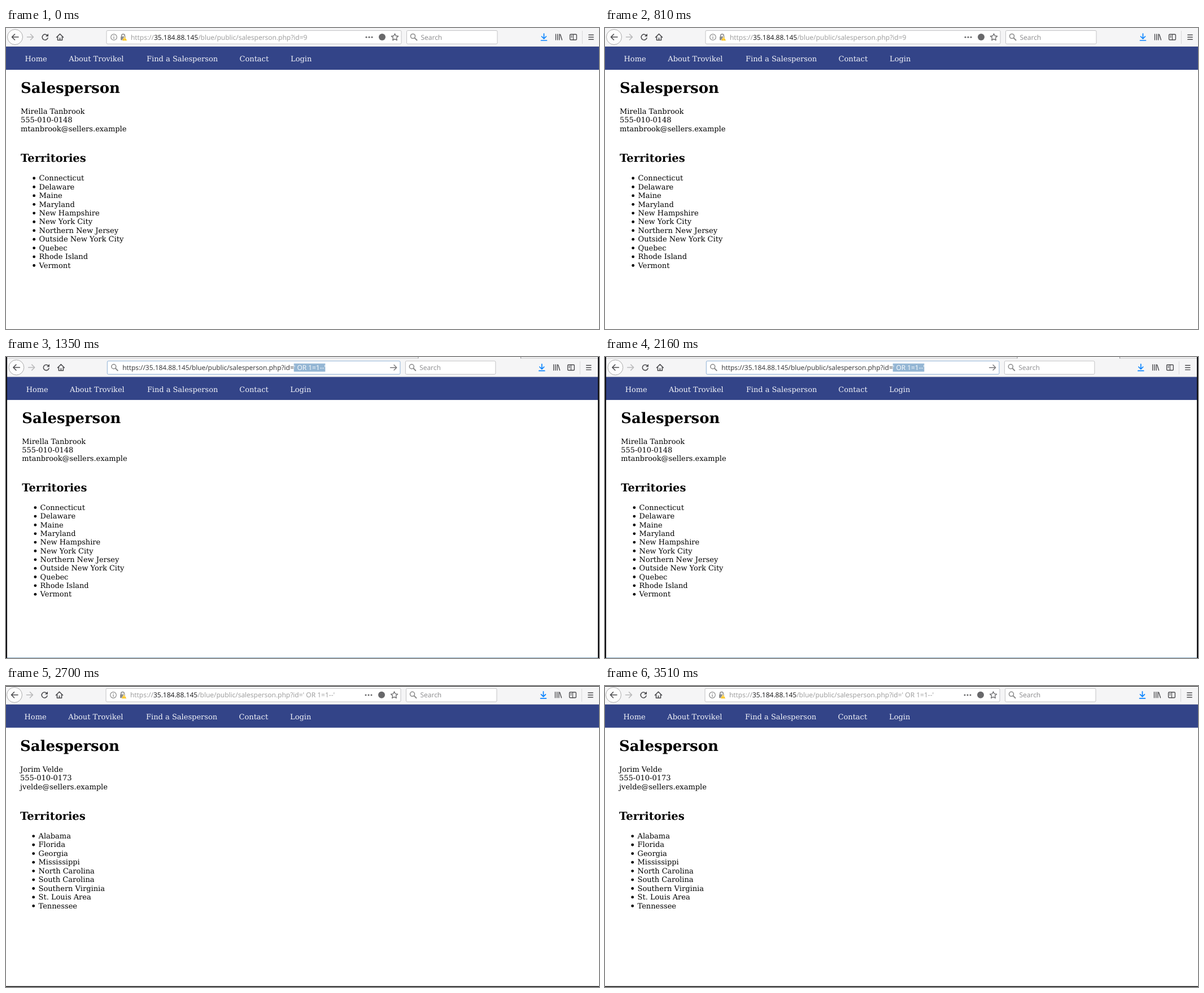
Animation, 1050 px wide and 533 px high, one loop 4.05 s. Source, as an HTML page:

```html
<!DOCTYPE html>
<html lang="en">
<head>
<meta charset="utf-8">
<title>Salesperson</title>
<style>
  html, body { margin: 0; width: 100%; height: 100%; overflow: hidden; background: #fff; }
  svg { display: block; width: 1050px; height: 533px; text-rendering: geometricPrecision; }
  .page { font: 13px "DejaVu Serif", serif; fill: #000; }
  .ui { font: 12px "Open Sans", sans-serif; }
</style>
</head>
<body>
<svg id="stage" viewBox="0 0 1050 533"></svg>
<script>
const HOLD = 1350;
const LINE = 15.45;
const INK = '#4c4c4f', GREY = '#8c8c8c';
const URL_PATH = '/blue/public/salesperson.php?id=';
const HOST = '35.184.88.145';
const INJECTED = "' OR 1=1--'";

const rect = (x, y, w, h, fill, more = '') =>
  `<rect x="${x}" y="${y}" width="${w}" height="${h}" fill="${fill}" ${more}/>`;
const dot = (x, y, r, fill, more = '') =>
  `<circle cx="${x}" cy="${y}" r="${r}" fill="${fill}" ${more}/>`;
const stroke = (d, color, w = 1.5) =>
  `<path d="${d}" fill="none" stroke="${color}" stroke-width="${w}" stroke-linecap="round" stroke-linejoin="round"/>`;
const text = (x, y, s, more = '') => `<text x="${x}" y="${y}" ${more}>${s}</text>`;
const span = (s, fill) => `<tspan fill="${fill}">${s}</tspan>`;

const people = {
  first: {
    contact: ['Mirella Tanbrook', '555-010-0148', 'mtanbrook@sellers.example'],
    areas: ['Connecticut', 'Delaware', 'Maine', 'Maryland', 'New Hampshire', 'New York City',
      'Northern New Jersey', 'Outside New York City', 'Quebec', 'Rhode Island', 'Vermont']
  },
  second: {
    contact: ['Jorim Velde', '555-010-0173', 'jvelde@sellers.example'],
    areas: ['Alabama', 'Florida', 'Georgia', 'Mississippi', 'North Carolina', 'South Carolina',
      'Southern Virginia', 'St. Louis Area', 'Tennessee']
  }
};

const magnifier = x =>
  dot(x - 1.5, 14.5, 4, 'none', `stroke="${GREY}" stroke-width="1.6"`) +
  stroke(`M${x + 1.6} 17.6L${x + 5.5} 21.5`, GREY, 2);

function star(cx, cy, r) {
  const pts = Array.from({ length: 10 }, (_, i) => {
    const a = i * Math.PI / 5 - Math.PI / 2, k = i % 2 ? r * 0.48 : r;
    return `${(cx + k * Math.cos(a)).toFixed(2)} ${(cy + k * Math.sin(a)).toFixed(2)}`;
  });
  return stroke(`M${pts.join('L')}Z`, '#68686a', 1.3);
}

function navButtons() {
  return dot(16, 16, 13.5, '#fdfdfd', 'stroke="#aaa"') +
    stroke('M22 16H11M15.5 11L10.5 16L15.5 21', INK, 1.6) +
    stroke('M37.5 16H48M43.5 11L48.5 16L43.5 21', '#b9b9ba', 1.6) +
    stroke('M73.2 13.2A5 5 0 1 0 74 17.5', INK, 1.6) +
    `<path d="M75 10V15H70Z" fill="${INK}"/>` +
    stroke('M89.5 16.5L95.5 10.5L101.5 16.5M91.5 15.5V21.5H99.5V15.5M95.5 21V17.8', INK, 1.6);
}

function menuButtons() {
  return stroke('M952.5 10V18.5M948.5 15L952.5 19L956.5 15M947.5 22H957.5', '#0a84ff', 1.7) +
    stroke('M973.5 11V21M976.7 11V21M979.9 11V21M981.5 11.5L984.5 21', INK, 1.4) +
    rect(998.6, 11.2, 11.8, 9.8, 'none', `rx="1.5" stroke="${INK}" stroke-width="1.4"`) +
    stroke('M1004.5 11.5V21M1000.8 13.8H1002.4M1000.8 16.2H1002.4', INK, 1.2) +
    rect(1020, 5, 1, 23, '#d9d9da') +
    stroke('M1031.8 12.2H1040.2M1031.8 16.2H1040.2M1031.8 20.2H1040.2', INK, 1.4);
}

function idleAddress(query) {
  return dot(191, 16.2, 5.3, 'none', `stroke="${GREY}" stroke-width="1.2"`) +
    stroke('M191 15.8V19', GREY, 1.3) + dot(191, 13.5, 0.8, GREY) +
    stroke('M204.7 15.5V13.5A2.8 2.8 0 0 1 210.3 13.5V15.5', GREY, 1.6) +
    rect(203, 15, 9, 6.5, GREY, 'rx="1"') +
    '<path d="M210 14.8L214.4 22.4H205.6Z" fill="#ffbf00" stroke="#f5f5f5" stroke-width=".7"/>' +
    rect(209.6, 17.2, 0.9, 2.6, '#fff') + rect(209.6, 20.4, 0.9, 0.9, '#fff') +
    text(221, 20.6, span('https://', '#999') + span(HOST, '#151516') + span(URL_PATH + query, '#999')) +
    [638, 643, 648].map(x => dot(x, 16.2, 1.5, '#68686a')).join('') +
    dot(666, 16, 6, '#68686a') +
    star(688.5, 16.5, 6.4);
}

function editedAddress() {
  return magnifier(191) +
    rect(510.5, 9, 56, 14.5, '#94b6d4') +
    text(205, 20.6, span('https://' + HOST + URL_PATH, '#303032') + span(INJECTED, '#fff')) +
    stroke('M682.5 16.2H693.5M689 11.5L693.7 16.2L689 20.9', '#77777a', 1.4);
}

function toolbar({ editing, query }) {
  return '<g class="ui">' +
    rect(-5, -5, 1060, 38, '#f5f5f6') + rect(-5, 32.3, 1060, 0.8, '#c9c9cc') +
    navButtons() +
    rect(178, 4.5, 522, 23.7, '#fff', `rx="2" stroke="${editing ? '#8fb1d6' : '#c3c3c5'}"`) +
    (editing ? editedAddress() : idleAddress(query)) +
    rect(709.5, 4.5, 160.5, 23.7, '#fff', 'rx="2" stroke="#c3c3c5"') +
    magnifier(722) + text(734.5, 20.6, 'Search', 'fill="#8a8a8c"') +
    menuButtons() + '</g>';
}

function page({ contact, areas }) {
  const links = [[33.5, 'Home'], [111.3, 'About Trovikel'], [249, 'Find a Salesperson'],
    [413.5, 'Contact'], [504, 'Login']];
  return '<g class="page">' +
    rect(-5, 33, 1060, 41, '#334488') +
    links.map(([x, s]) => text(x, 59.4, s, 'fill="#f4f5fa"')).join('') +
    text(26, 115.4, 'Salesperson', 'font-size="26" font-weight="bold"') +
    contact.map((s, i) => text(26, 152 + i * LINE, s)).join('') +
    text(26, 237, 'Territories', 'font-size="19.5" font-weight="bold"') +
    areas.map((s, i) => dot(49.7, 266 + i * LINE, 2.4, '#000') + text(58.5, 270.2 + i * LINE, s)).join('') +
    '</g>';
}

const windowEdges =
  rect(0, 0, 1050, 2, '#ececed') + rect(730, 0, 181, 2, '#fafafa') +
  rect(2, 2, 728, 0.7, '#c4c4c6') + rect(911, 2, 137, 0.7, '#c4c4c6') +
  rect(729.5, 0, 1, 2.5, '#88888a') + rect(911, 0, 1, 2.5, '#88888a') +
  rect(2, 532, 1046, 1, '#8fb0c8') +
  rect(0, 0, 2, 533, '#0c0c10') + rect(1048, 0, 2, 533, '#0c0c10');

const scenes = [
  { person: people.first, query: '9', place: '', edges: '' },
  { person: people.first, editing: true, edges: windowEdges,
    place: 'translate(2.5 2.6) scale(.9935 .993)' },
  { person: people.second, query: INJECTED, place: 'translate(-1 -.2)',
    edges: rect(0, 0, 1050, 1, '#111') + rect(0, 531.5, 1050, 1.5, '#111') }
];

const stage = document.getElementById('stage');
stage.innerHTML = scenes.map(s =>
  `<g>${rect(0, 0, 1050, 533, '#fff')}<g transform="${s.place}">${toolbar(s)}${page(s.person)}</g>${s.edges}</g>`
).join('');

function draw(time) {
  const now = Math.floor(time / HOLD) % scenes.length;
  [...stage.children].forEach((g, i) => g.setAttribute('display', i === now ? 'inline' : 'none'));
}

function tick() {
  draw(performance.now());
  requestAnimationFrame(tick);
}
tick();
</script>
</body>
</html>
```
